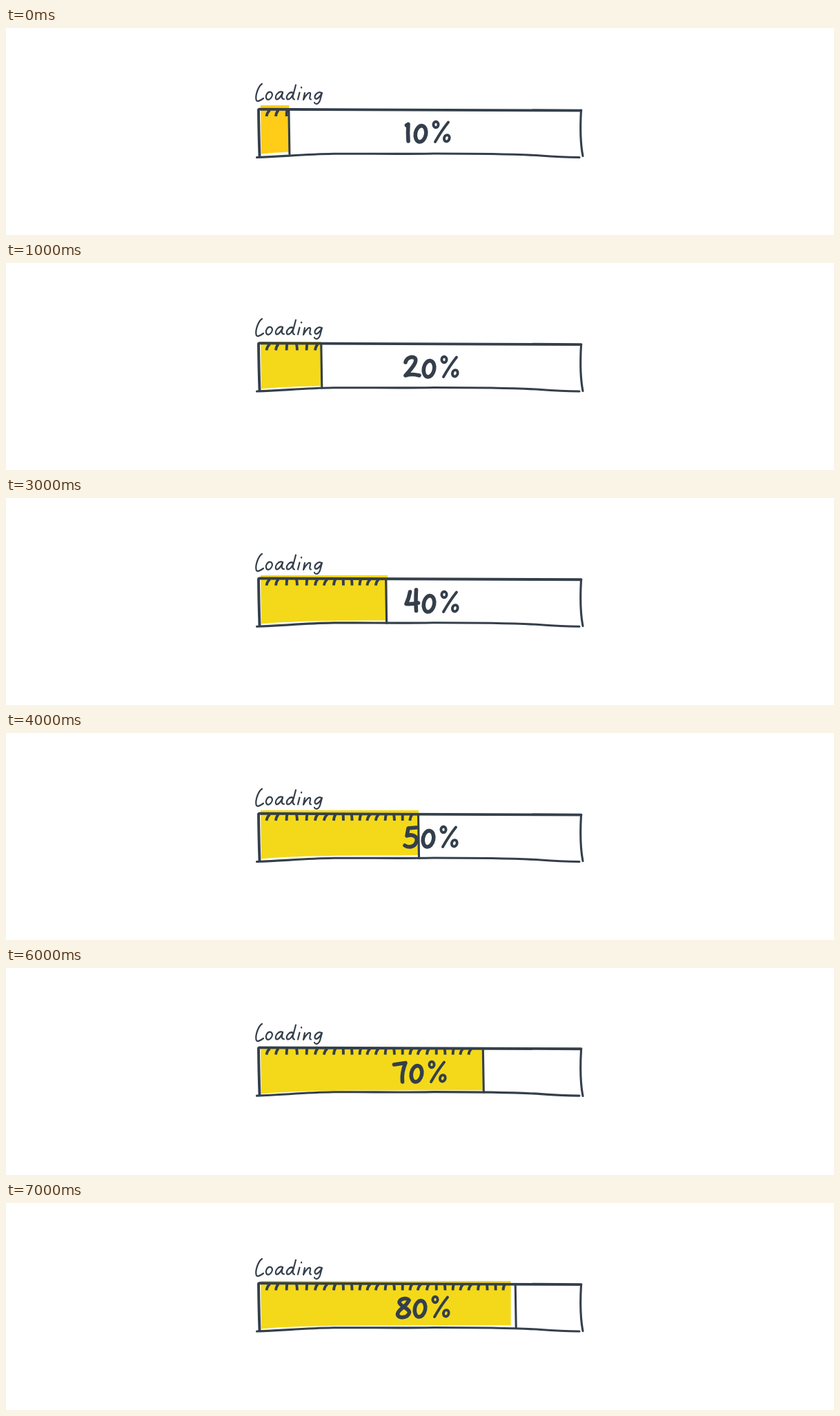
Recreate the animation shown at these times as an HTML page. Size 1200 by 300 pixels, loop 8000 ms.

```html
<!DOCTYPE html>
<html lang="en">
<head>
<meta charset="utf-8">
<title>Loading</title>
<style>
  html, body { margin: 0; width: 100%; height: 100%; overflow: hidden; background: #fff; }
  svg { display: block; width: 100%; height: 100%; }
  .ink { fill: none; stroke: #343f4b; stroke-width: 3.1; stroke-linecap: round; stroke-linejoin: round; }
  .ink .thin { stroke-width: 2.2; }
  .ink .bold { stroke-width: 5.6; }
  .ink .mid { stroke-width: 3.9; }
</style>
</head>
<body>
<svg viewBox="0 0 1200 300" role="img">
  <polygon id="fill"/>
  <g class="ink">
    <g id="box">
      <path class="mid" d="M366 118.5 Q366.3 150 367.5 185.5"/>
      <path class="mid" d="M367 117.8 L833.5 119.6"/>
      <path d="M363.5 187.5 C400 186.5 430 183 475 182.2 C530 182 570 183 620 182 C690 182 740 182.8 775 185 C800 187 812 187.4 831 187.5"/>
      <path id="ticks" class="mid" stroke-linecap="butt"/>
      <path id="divider"/>
    </g>
    <path d="M833.5 119 C832 145 832.5 168 836 185.5"/>

    <!-- handwritten "Loading" -->
    <path class="thin" d="
      M371 81 C366 84 361 97 362.6 104 C363.5 108 369 105 373 102
      M384 93 C379 91 375 99 378 103 C382 106 388 98 385 94
      M401 93 C395 90 389 99 391.5 103 C395 105 399 98 401 94 C399 99 399 103 403 103
      M416 94 C411 91 405 99 407.5 103 C411 105 415 99 417 94 L420 82.5 M417 94 C415 99 415 103 418 103.5
      M425.5 93.5 L423 103.5 M428 86 L428.2 86.5
      M433 94 L431 104 C434 98 439 92 441 94.5 C442 97 438 103 442 103.5
      M457 94 C452 91 446 98 448 102 C451 105 456 98 458 94 L455 105 C453 111 448 111 447 108"/>

    <path id="digit" class="bold"/>
    <g id="tail">
      <ellipse class="bold" cy="153.3" rx="7.6" ry="11.8" transform="rotate(11 0 153.3)"/>
      <g class="mid">
        <path d="M40 136.5 Q30 149 21 165"/>
        <ellipse cx="22" cy="140" rx="3.6" ry="4.3"/>
        <ellipse cx="37.8" cy="159.8" rx="3.8" ry="4.7" transform="rotate(20 37.8 159.8)"/>
      </g>
    </g>
  </g>
</svg>
<script>
const $ = id => document.getElementById(id);
const set = (id, name, value) => $(id).setAttribute(name, value);

// dy: box shift, top: fill's upper edge, over: fill past the divider, zero: x of the "0"
const states = [
  { dy: 0, top: 112, over: 0, zero: 601, digit: "M580.5 141 L583 139.5 Q582 152 583 164" },
  { dy: -1.5, top: 114, over: -1, zero: 613, digit: "M579 144 C580 138 588 134 593 138 C597 144 585 156 579 163 Q588 160 599 163" },
  { dy: -1, top: 113, over: 0, zero: 612, digit: "M580 140 C586 135 595 136 594 142 Q592 148 585 150 C594 149 598 155 594 161 C590 166 583 166 579 163" },
  { dy: -1.3, top: 112, over: 2, zero: 613, digit: "M585.5 136 Q584 145 580 153.5 Q588 154 597.5 152 M594.5 133 Q593.5 150 594.5 163.5" },
  { dy: -1, top: 112, over: 0, zero: 612, digit: "M595 137 L583 138 L581 149 C589 146 597 150 595 157 C593 165 584 167 578 163" },
  { dy: -2.7, top: 115, over: 0, zero: 608, digit: "M576.5 136.5 C570.5 149 572 164 582 164.5 C591 163 593 154 589.5 152 Q581 153 583 164" },
  { dy: -2.4, top: 116, over: -1, zero: 595, digit: "M562.5 140 L579 137.5 Q573 152 574.5 165" },
  { dy: -1.5, top: 113, over: -7, zero: 600, digit: "M584 141 C581 137 571 138 570 144 C570 149 585 153 584.5 159 C582 167 568 168 567.5 161 C568 154 580 151 584 141" }
];

// Evenly spaced hatch marks with a wandering lean; the first few spread out
function hatch(count) {
  let d = "";
  for (let i = 0; i < count; i++) {
    const x = 380 + 12.25 * i + 11 * (1 - Math.exp(-i * i / 16));
    const lean = -2 + 3 * Math.cos((i - 3) * Math.PI / 2.8);
    d += `M${x - lean / 2} 119 Q${x + lean * 0.3} 122 ${x + lean / 2} 128`;
  }
  return d;
}

// Flat top, lower edge rising from the left corner and levelling out
function fillShape(right, top) {
  let points = `369,${top} ${right},${top}`;
  for (let i = 0; i <= 16; i++) {
    const x = right + (370 - right) * i / 16;
    points += ` ${x},${177.3 + 5.2 * Math.exp((370 - x) / 50)}`;
  }
  return points;
}

function show(n) {
  const { dy, top, over, zero, digit } = states[n];
  const x = 410.4 + 46.9 * n;
  set("fill", "points", fillShape(x + over, top));
  set("fill", "fill", n ? "#f4d91a" : "#ffcd17");
  set("box", "transform", `translate(0 ${dy})`);
  set("ticks", "d", hatch(Math.round(3.55 * (n + 1) - 0.9)));
  set("divider", "d", `M${x - 0.5} 119 L${x + 0.5} 182.5`);
  set("digit", "d", digit);
  set("tail", "transform", `translate(${zero} 0)`);
  document.querySelector("svg").setAttribute("aria-label", `Loading ${10 * (n + 1)}%`);
}

const start = performance.now();
let shown = -1;
function frame(now) {
  const n = Math.floor(Math.max(0, now - start) / 1000) % states.length;
  if (n !== shown) show(shown = n);
  requestAnimationFrame(frame);
}
frame(start);
</script>
</body>
</html>
```
